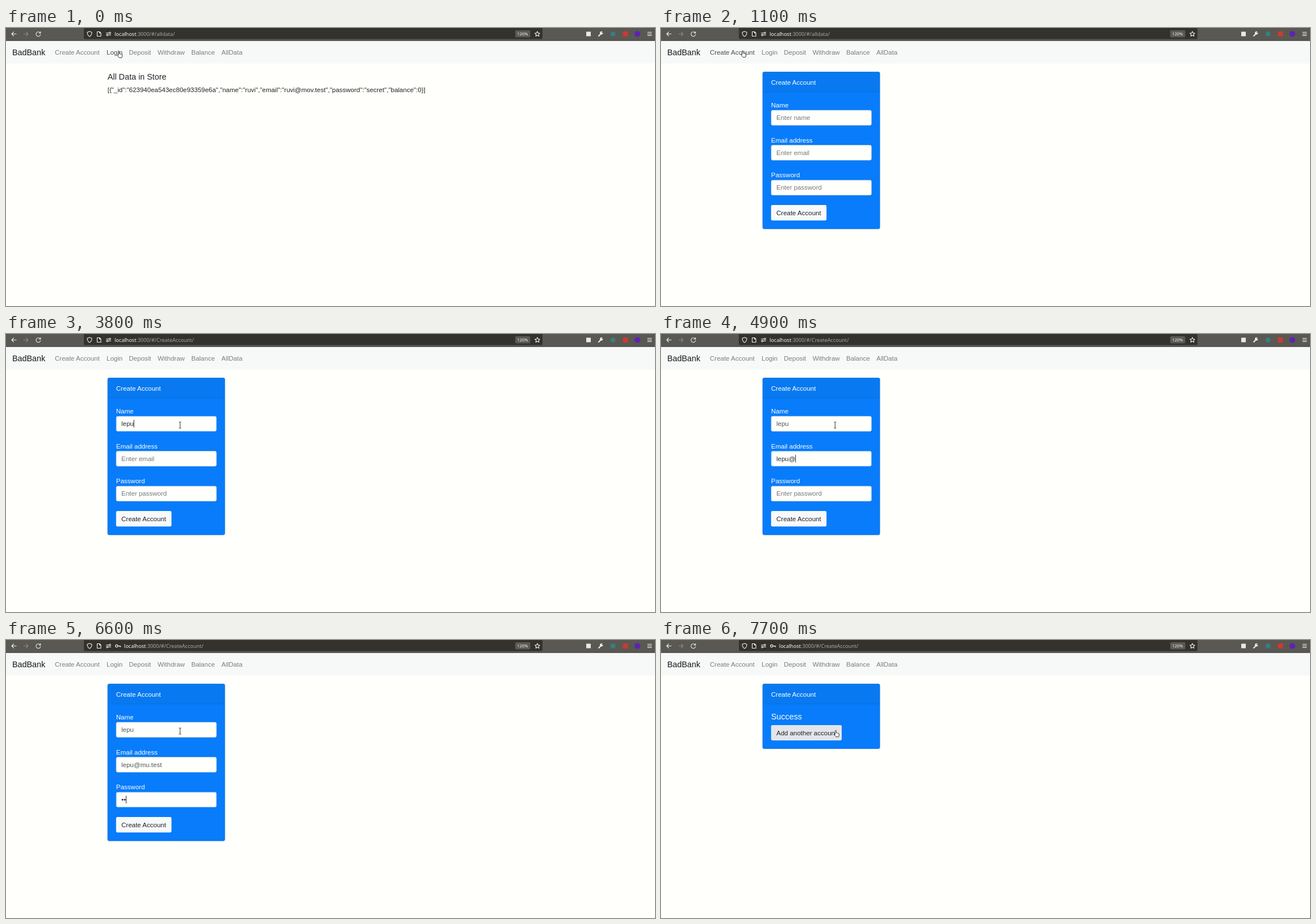
These frames come from a looping animation (1142x490 px, 8 s). An HTML page:

```html
<!DOCTYPE html>
<html lang="en">
<head>
<meta charset="utf-8">
<title>Create account</title>
<style>
  html, body { margin: 0; width: 100%; height: 100%; overflow: hidden; background: #fffffc; }
  svg { display: block; width: 100vw; height: 100vh; }
  text { font: 11.5px "Liberation Sans", Arial, sans-serif; fill: #212529; white-space: pre; }
  .big { font-size: 14.35px; }
  .white { fill: #fff; }
  .nav text { fill: #7c7d7d; }
  .nav text.hover { fill: #4b4b4b; }
  .bar text { font: 9.05px "Noto Sans", sans-serif; fill: #fafaf8; }
  .bar .zoom { font-size: 7.5px; }
  .icon { fill: none; stroke: #f0f0ec; stroke-width: 1.1; stroke-linecap: round; stroke-linejoin: round; }
  .button { fill: #f8f9fa; }
</style>
</head>
<body>
<svg viewBox="0 0 1142 490">
  <rect width="1142" height="490" fill="#fffffc"/>

  <g class="bar">
    <rect width="1142" height="22" fill="#595852"/>
    <rect y="21.7" width="1142" height="1.2" fill="#42413d"/>
    <path d="M137 0H944V17.5q0 2-2 2H139q-2 0-2-2z" fill="#33322d"/>
    <g class="icon">
      <path d="M18 10.5H10M13.5 7L10 10.5L13.5 14"/>
      <path d="M31 10.5H39M35.500 7L39 10.5L35.500 14" stroke="#898882"/>
      <path d="M60 8.200A4 4 0 1 0 60.800 11.500M60.800 6.500V9H58.200"/>
      <path d="M147 6L151 7.500Q151 13 147 15Q143 13 143 7.500Z"/>
      <path d="M160.500 6.500H164.500L167 9V14.500H160.500ZM164.500 6.500V9H167"/>
      <path d="M176.500 8.700H181M184.500 12.300H180"/>
      <circle cx="182.800" cy="8.700" r="1.400"/><circle cx="178.200" cy="12.300" r="1.400"/>
      <path d="M935 6L936.300 8.900L939.400 9.200L937.100 11.300L937.800 14.400L935 12.800L932.200 14.400L932.900 11.300L930.600 9.200L933.700 8.900Z"/>
      <path d="M1043 14L1047 10" stroke-width="2"/>
      <path d="M1049 6.500A2.500 2.500 0 1 0 1050.300 8.800L1048.200 9L1047.500 8Z" fill="#f0f0ec" stroke-width=".6"/>
      <path d="M1129 7.500H1136M1129 10.300H1136M1129 13.100H1136"/>
      <g id="key"><circle cx="194.700" cy="10.500" r="2.100"/><path d="M197 10.500H201.500V12.300M199.300 10.500V11.800"/></g>
    </g>
    <rect x="1021" y="6.500" width="8" height="8" fill="#e8e8e4"/>
    <circle cx="1068" cy="10.500" r="4.500" fill="#397d80"/>
    <rect x="1085.500" y="6" width="9" height="9" fill="#c93a35"/>
    <circle cx="1111" cy="10.500" r="5" fill="#5d22b5"/>
    <rect x="896" y="4" width="26.500" height="12.500" rx="2" fill="#5b5a55"/>
    <text class="zoom" x="899.500" y="12.800">120%</text>
    <text id="url" y="13.800">localhost<tspan id="path" fill="#aaa9a3"></tspan></text>
  </g>

  <g class="nav">
    <rect y="22.900" width="1142" height="39.800" fill="#f7f8f8"/>
    <text x="11" y="48" class="big" style="fill:#191919">BadBank</text>
    <text id="createLink" x="86" y="47">Create Account</text>
    <text id="loginLink" x="177" y="47">Login</text>
    <text x="216.300" y="47">Deposit</text>
    <text x="266.700" y="47">Withdraw</text>
    <text x="326" y="47">Balance</text>
    <text x="379" y="47">AllData</text>
  </g>

  <g id="store">
    <text class="big" x="178.700" y="91">All Data in Store</text>
    <text x="178.700" y="113">[{"_id":"623940ea543ec80e93359e6a","name":"ruvi","email":"ruvi@mov.test","password":"secret","balance":0}]</text>
  </g>

  <g id="card">
    <rect id="cardBody" x="179" y="77.500" width="206" rx="2.400" fill="#087cfa" stroke="#0b6fdc" stroke-width=".8"/>
    <path d="M179.400 112.400V79.900Q179.400 77.900 181.400 77.900H382.600Q384.600 77.900 384.600 79.900V112.400Z" fill="#0879f0"/>
    <path d="M179 112.600H385" stroke="#0a6edb" stroke-width=".8"/>
    <text class="white" x="193.800" y="99.500">Create Account</text>
    <g id="form">
      <g id="fields"></g>
      <rect id="ring" x="192.600" y="310.800" width="99.600" height="29.600" rx="3.500" fill="none" stroke="#f8f9fa" stroke-width="2.300"/>
      <rect id="submit" class="button" x="193.700" y="312" width="97.500" height="27.300" rx="2.400"/>
      <text x="203" y="330">Create Account</text>
    </g>
    <g id="success">
      <text class="big white" x="193.800" y="140.300">Success</text>
      <rect id="another" class="button" x="193.700" y="150" width="124.300" height="27" rx="2.400"/>
      <text x="203" y="167.500">Add another account</text>
    </g>
  </g>

  <g id="cursor">
    <path id="hand" d="M.2 .2Q.2-1 1.200-1Q2.200-1 2.200 .2V3.500Q3.500 3 4 4Q5.200 3.600 5.600 4.600Q7 4.400 7 5.800V8L6 10.500H1.800L-1.400 6.600Q-1.600 5.400-.5 5.500L.2 6.200Z" fill="#fff" stroke="#222" stroke-width=".9" stroke-linejoin="round"/>
    <path id="arrow" d="M0 0V10L2.300 7.900L3.900 11.300L5.400 10.600L3.900 7.400H7Z" fill="#222" stroke="#fff" stroke-width=".7"/>
    <path id="beam" d="M-2-5.200Q0-5.200 0-4V5Q0 6 -2 6M2-5.200Q0-5.200 0-4M0 5Q0 6 2 6" fill="none" stroke="#333" stroke-width="1"/>
  </g>
</svg>

<script>
const LOOP = 8000, STEP = 100;
const $ = id => document.getElementById(id);
const show = (id, on) => $(id).style.display = on ? '' : 'none';
const clamp = v => Math.max(0, Math.min(1, v));
const ease = v => (v = clamp(v), v * v * (3 - 2 * v));
const lerp = (a, b, k) => a + (b - a) * k;
const mix = (a, b, k) => `rgb(${a.map((v, i) => Math.round(lerp(v, b[i], k)))})`;

// keys: [time, number of characters shown]
const fields = [
  { label: 'Name', hint: 'Enter name', value: 'lepu', top: 144.8, focus: 2000, blur: 4000,
    keys: [[3000, 1], [3100, 0], [3300, 1], [3500, 3], [3800, 4]] },
  { label: 'Email address', hint: 'Enter email', value: 'lepu@mu.test', top: 206.4, focus: 4000, blur: 6100,
    keys: [[4300, 1], [4400, 2], [4500, 3], [4600, 4], [4900, 5], [5100, 6], [5200, 7],
           [5500, 8], [5600, 9], [5700, 10], [5800, 12]] },
  { label: 'Password', hint: 'Enter password', value: '••••••', top: 268, focus: 6100, blur: 7300,
    keys: [[6500, 1], [6600, 2], [6700, 3], [6900, 4], [7100, 6]] }
];

function add(tag, attributes, content = '') {
  const node = document.createElementNS('http://www.w3.org/2000/svg', tag);
  for (const name in attributes) node.setAttribute(name, attributes[name]);
  node.textContent = content;
  return $('fields').appendChild(node);
}

for (const f of fields) {
  add('text', { class: 'white', x: 193.8, y: f.top - 4.7 }, f.label);
  f.box = add('rect', { x: 194, y: f.top + .2, width: 176.2, height: 26.4, rx: 2.4, fill: '#fffffc', 'stroke-width': .7 });
  f.text = add('text', { x: 203, y: f.top + 17.4 });
  f.caret = add('rect', { y: f.top + 6.5, width: 1, height: 13.5, fill: '#222' });
}

function drawField(f, t) {
  const count = f.keys.reduce((n, [time, shown]) => t >= time ? shown : n, 0);
  const focus = t < f.blur ? clamp((t - f.focus + 50) / 150) : clamp(1 - (t - f.blur + 50) / 150);
  f.text.textContent = count ? f.value.slice(0, count) : f.hint;
  f.text.style.fill = count ? mix([82, 86, 90], [44, 48, 52], focus) : mix([117, 121, 123], [82, 86, 88], focus);
  f.box.setAttribute('stroke', mix([206, 212, 218], [128, 189, 255], focus));
  f.caret.style.display = t > f.focus && t < f.blur ? '' : 'none';
  f.caret.setAttribute('x', 202.8 + (count ? f.text.getComputedTextLength() : 0));
}

function drawCursor(t) {
  const toLink = ease((t - 600) / 300), toField = ease((t - 1300) / 600);
  const x = lerp(lerp(197.5, 142.5, toLink), 306.3, toField);
  const y = lerp(lerp(42, 41, toLink), 160.2, toField);
  const onLink = y > 30 && y < 56;
  const overCreate = onLink && x > 81 && x < 171;
  const overLogin = onLink && x >= 171 && x < 211;
  const hand = overCreate || overLogin || t >= 7700;
  const beam = !hand && x > 194 && y > 145;
  $('createLink').classList.toggle('hover', overCreate);
  $('loginLink').classList.toggle('hover', overLogin);
  show('hand', hand);
  show('beam', beam);
  show('arrow', !hand && !beam);
  $('cursor').setAttribute('transform', `translate(${x} ${y})`);
}

function draw(t) {
  const done = t >= 7600, secure = t >= 6500;
  show('store', t < 1100);
  show('card', t >= 1100);
  show('form', !done);
  show('success', done);
  show('key', secure);
  $('cardBody').setAttribute('height', done ? 114 : 276.5);
  $('url').setAttribute('x', secure ? 207.800 : 191);
  $('path').textContent = ':3000/#/' + (t < 1200 ? 'alldata/' : 'CreateAccount/');

  const pressed = clamp((t - 7250) / 150);
  $('ring').style.opacity = pressed / 2;
  $('submit').style.fill = mix([248, 249, 250], [226, 230, 234], pressed);
  $('another').style.fill = mix([248, 249, 250], [226, 230, 234], clamp((t - 7550) / 150));

  fields.forEach(f => drawField(f, t));
  drawCursor(t);
}

const start = performance.now();
function frame() {
  const t = (performance.now() - start) % LOOP;
  draw(Math.floor(t / STEP) * STEP);
  requestAnimationFrame(frame);
}
frame();
</script>
</body>
</html>
```
